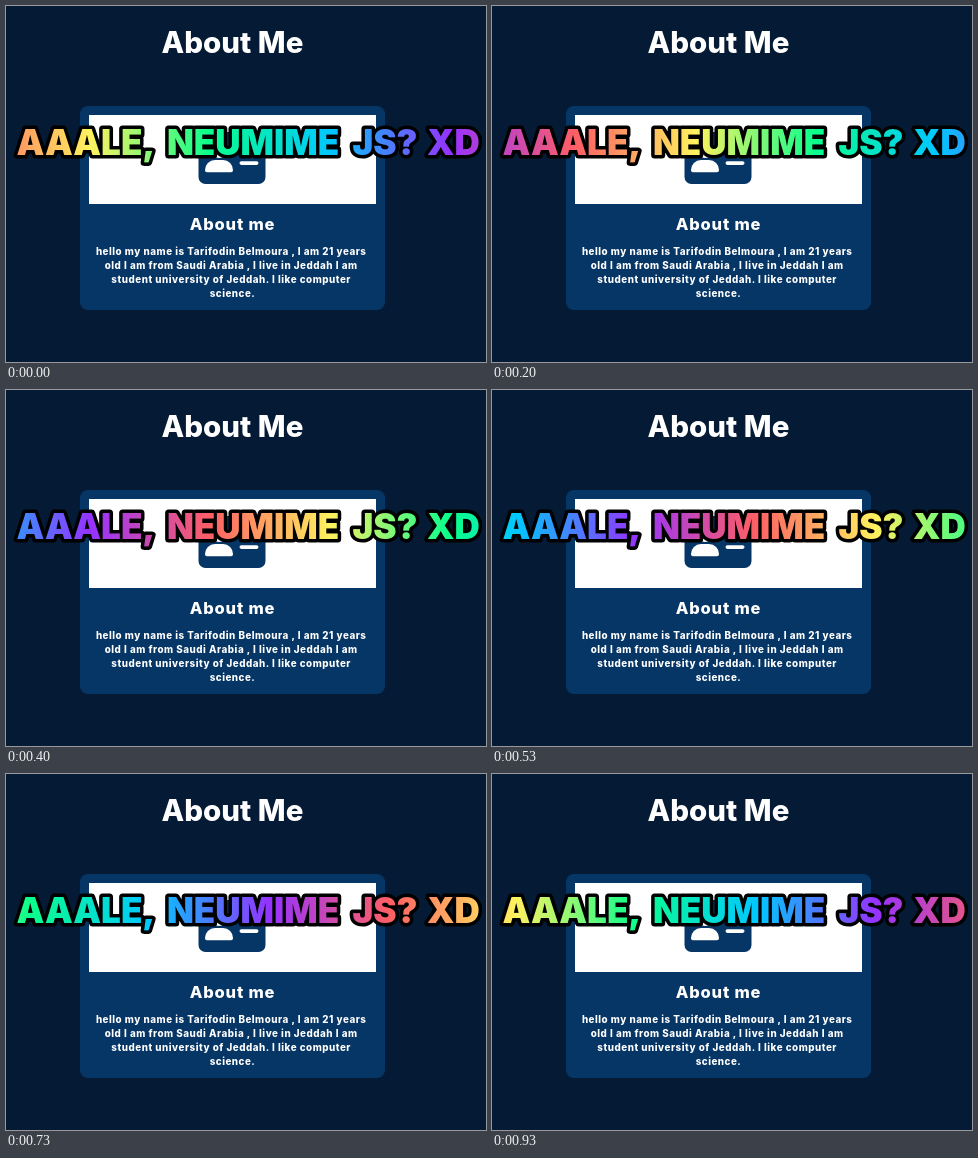
Recreate the animation shown at these times as an HTML page. Size 480x356 px, loop 990 ms.

```html
<!DOCTYPE html>
<html lang="en">
<head>
<meta charset="utf-8">
<title>About Me</title>
<style>
  html, body { margin: 0; width: 100%; height: 100%; overflow: hidden; background: #051a34; }
  svg { display: block; width: 100vw; height: 100vh; }
  text { font-family: Inter, "Open Sans", sans-serif; font-weight: 800; fill: #fff; text-anchor: middle; }
  .title { font-size: 29.5px; }
  .heading { font-size: 16.5px; letter-spacing: .8px; }
  .body { font-size: 9.8px; letter-spacing: .52px; }
  .caption text {
    font-size: 35px; font-weight: 900; fill: url(#rainbow);
    stroke: #000; stroke-width: 7px; stroke-linejoin: round; paint-order: stroke;
  }
</style>
</head>
<body>
<svg viewBox="0 0 480 356" preserveAspectRatio="none">
  <defs>
    <linearGradient id="rainbow" gradientUnits="userSpaceOnUse" x1="84" x2="684" spreadMethod="repeat">
      <stop offset="0" stop-color="#fff25f"/>
      <stop offset=".2" stop-color="#0aff8c"/>
      <stop offset=".4" stop-color="#00c8ff"/>
      <stop offset=".6" stop-color="#9632ff"/>
      <stop offset=".8" stop-color="#ff5f64"/>
      <stop offset="1" stop-color="#fff25f"/>
    </linearGradient>
  </defs>

  <rect width="480" height="356" fill="#051a34"/>
  <text class="title" x="226.5" y="46.5">About Me</text>

  <rect x="74" y="100" width="305" height="204" rx="8" fill="#063666"/>
  <rect x="83" y="109" width="287" height="89" fill="#fff"/>

  <g fill="#fff">
    <rect x="192.5" y="126" width="67" height="52" rx="7" fill="#063666"/>
    <circle cx="213" cy="144.6" r="7.4"/>
    <path d="M209 154h8a10 10 0 0 1 10 10.2a2 2 0 0 1-2 2h-24a2 2 0 0 1-2-2a10 10 0 0 1 10-10.2z"/>
    <rect x="233.5" y="140.2" width="19" height="3.7" rx="1.8"/>
    <rect x="233.5" y="147.7" width="19" height="3.7" rx="1.8"/>
    <rect x="233.5" y="155.2" width="19" height="3.7" rx="1.8"/>
  </g>

  <text class="heading" x="226.5" y="224">About me</text>
  <text class="body">
    <tspan x="226.5" y="249">hello my name is Tarifodin Belmoura , I am 21 years</tspan>
    <tspan x="226.5" y="263">old I am from Saudi Arabia , I live in Jeddah I am</tspan>
    <tspan x="226.5" y="277">student university of Jeddah. I like computer</tspan>
    <tspan x="226.5" y="291">science.</tspan>
  </text>

  <g class="caption">
    <text x="80" y="148.5">AAALE,</text>
    <text x="247" y="148.5">NEUMIME</text>
    <text x="379" y="148.5">JS?</text>
    <text x="447.5" y="148.5">XD</text>
  </g>
</svg>
<script>
  const LOOP = 990, FRAMES = 15, PERIOD = 600;
  const POSE_MS = 50, POSES = 20;
  const rainbow = document.getElementById('rainbow');
  // The page shows 15 frames a second of a rainbow that itself moves in 50 ms poses.
  const starts = Array.from({ length: FRAMES }, (_, i) => Math.round(i * 20 / 3) * 10);

  function draw(now) {
    const t = now % LOOP;
    const start = starts.findLast(s => s <= t);
    const pose = Math.floor(start / POSE_MS);
    rainbow.setAttribute('gradientTransform', `translate(${pose * PERIOD / POSES} 0)`);
  }

  const origin = performance.now();
  function tick() {
    draw(Math.max(0, performance.now() - origin));
    requestAnimationFrame(tick);
  }
  tick();
</script>
</body>
</html>
```
